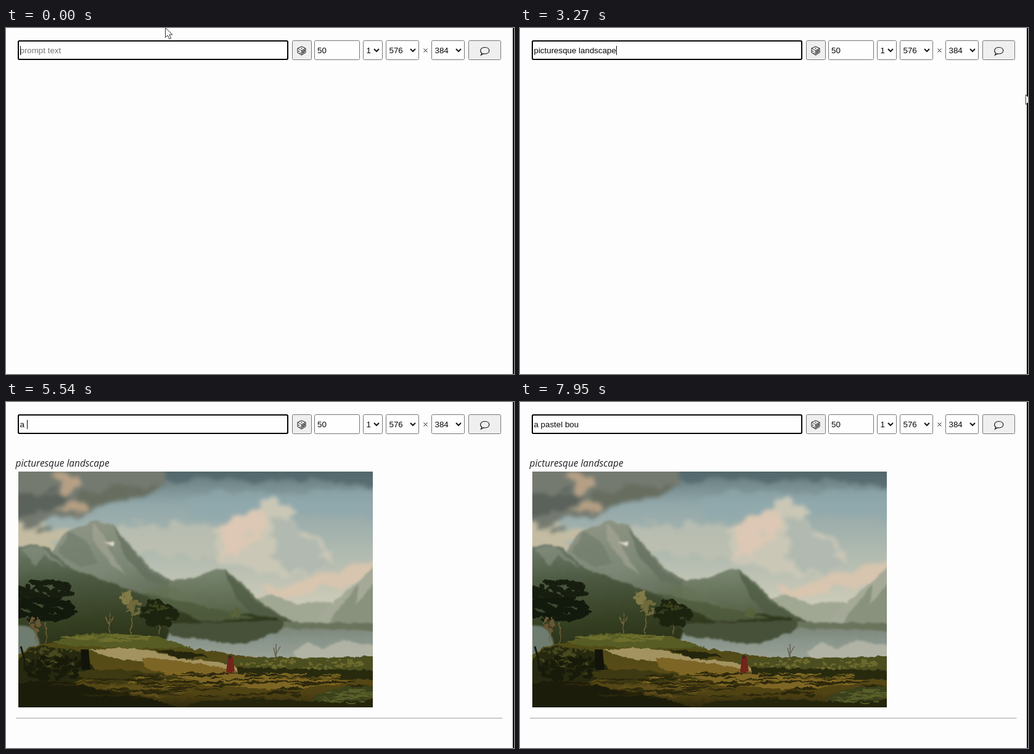
Animation of 824 by 562 pixels, one loop 7990 ms. Source, as an HTML page:

```html
<!DOCTYPE html>
<html lang="en">
<head>
<meta charset="utf-8">
<title>Prompt to picture</title>
<style>
html, body { margin: 0; width: 100%; height: 100%; overflow: hidden; background: #fdfdfd; }
svg { display: block; width: 824px; height: 562px; }
.ui { font: 13.333px "Liberation Sans", Arial, sans-serif; fill: #080808; white-space: pre; }
.box { fill: #fefefe; stroke: #767676; }
.button { fill: #efefef; }
.line { fill: none; stroke: #181818; }
</style>
</head>
<body>
<svg viewBox="0 0 824 562" xmlns="http://www.w3.org/2000/svg">
  <defs>
    <linearGradient id="sky" x2="0" y2="1">
      <stop offset="0" stop-color="#64787a"/><stop offset=".14" stop-color="#92a8aa"/>
      <stop offset=".36" stop-color="#b2bbb0"/><stop offset=".58" stop-color="#cfcdb9"/>
      <stop offset="1" stop-color="#c2bfa8"/>
    </linearGradient>
    <linearGradient id="peak" x2=".4" y2="1">
      <stop offset="0" stop-color="#929786"/><stop offset=".5" stop-color="#7c8775"/>
      <stop offset="1" stop-color="#505c43"/>
    </linearGradient>
    <linearGradient id="slope" x2=".2" y2="1">
      <stop offset="0" stop-color="#707d6c"/><stop offset=".35" stop-color="#4d5a42"/>
      <stop offset=".75" stop-color="#343e21"/><stop offset="1" stop-color="#293016"/>
    </linearGradient>
    <linearGradient id="ridge" x2=".1" y2="1">
      <stop offset="0" stop-color="#7b8771"/><stop offset=".5" stop-color="#647158"/>
      <stop offset="1" stop-color="#4c573c"/>
    </linearGradient>
    <linearGradient id="lake" x2="0" y2="1">
      <stop offset="0" stop-color="#788273"/><stop offset=".4" stop-color="#88948a"/>
      <stop offset="1" stop-color="#a3a89b"/>
    </linearGradient>
    <linearGradient id="land" x2="0" y2="1">
      <stop offset="0" stop-color="#4c4b18"/><stop offset=".45" stop-color="#594b17"/>
      <stop offset=".72" stop-color="#4f4213"/><stop offset="1" stop-color="#17160a"/>
    </linearGradient>
    <filter id="cloud" x="-10%" y="-10%" width="120%" height="120%" color-interpolation-filters="sRGB">
      <feTurbulence type="fractalNoise" baseFrequency=".03 .05" numOctaves="5" seed="9"/>
      <feDisplacementMap in="SourceGraphic" scale="36" xChannelSelector="R" yChannelSelector="G"/>
      <feGaussianBlur stdDeviation="3"/>
    </filter>
    <filter id="haze" x="-5%" y="-5%" width="110%" height="110%" color-interpolation-filters="sRGB">
      <feTurbulence type="fractalNoise" baseFrequency=".06" numOctaves="3" seed="4"/>
      <feDisplacementMap in="SourceGraphic" scale="7" xChannelSelector="R" yChannelSelector="G"/>
      <feGaussianBlur stdDeviation="1.400"/>
    </filter>
    <filter id="brush" x="-5%" y="-5%" width="110%" height="110%" color-interpolation-filters="sRGB">
      <feTurbulence type="fractalNoise" baseFrequency=".09" numOctaves="3" seed="2"/>
      <feDisplacementMap in="SourceGraphic" scale="7" xChannelSelector="R" yChannelSelector="G"/>
      <feGaussianBlur stdDeviation=".7"/>
    </filter>
    <clipPath id="canvas"><rect x="20" y="113" width="575" height="383"/></clipPath>
  </defs>

  <rect width="824" height="562" fill="#fdfdfd"/>
  <rect x="822" width="2" height="562" fill="#060606"/>
  <g id="controls"></g>
  <rect id="focus" x="20" y="21" width="437" height="30" rx="2" fill="none" stroke="#060606" stroke-width="2"/>
  <text id="prompt" class="ui" x="22.5" y="41"></text>
  <rect id="caret" y="29" width="1" height="15" fill="#080808"/>

  <g id="result">
    <text x="15.5" y="105" font-family="'Open Sans', 'Noto Sans', sans-serif" font-size="15.4" font-style="italic" fill="#222">picturesque landscape</text>
    <path id="rule" d="M16 0H805.500" stroke="#a0a0a0"/>
  </g>

  <g id="painting" clip-path="url(#canvas)">
    <rect x="20" y="113" width="575" height="383" fill="url(#sky)"/>
    <g filter="url(#cloud)">
      <path d="M240 95H620V142Q510 124 390 126Q300 130 240 126Z" fill="#4b6064" opacity=".65"/>
      <path d="M250 162Q390 140 620 146V190Q470 172 330 188Z" fill="#8faaae" opacity=".65"/>
      <path d="M170 207Q270 190 350 205L340 255Q260 250 200 240Z" fill="#c1c2b2" opacity=".7"/>
      <path d="M0 95H250Q265 135 250 148Q190 158 150 174Q115 192 85 190Q60 206 0 204Z" fill="#747a70"/>
      <path d="M0 155Q70 135 105 155Q85 180 0 190Z" fill="#5b625b"/>
      <path d="M120 150Q190 128 260 142Q190 162 130 173Z" fill="#676e60"/>
      <path d="M74 121Q110 108 129 124Q118 146 86 147Z" fill="#b5a085"/>
      <path d="M86 174Q110 157 132 171Q115 183 86 174Z" fill="#b39e83"/>
      <path d="M0 205Q60 198 105 208L80 242H0Z" fill="#c4bca2"/>
      <path d="M343 205Q370 175 412 172Q428 146 452 158Q478 175 470 205Q520 215 512 240Q550 255 505 278Q430 285 390 262Q350 270 335 248Z" fill="#cac7b6"/>
      <path d="M350 198Q390 165 424 180Q430 205 395 225Q365 250 338 254Q360 225 350 198Z" fill="#dcc8b4"/>
      <path d="M432 185Q480 190 472 220Q525 232 500 250L528 268Q470 288 436 260Z" fill="#a9b4ae" opacity=".75"/>
      <path d="M415 303Q520 290 620 244V280Q530 307 425 316Z" fill="#ddc6ae" opacity=".85"/>
    </g>
    <g filter="url(#haze)">
      <path d="M405 320L432 313L470 327L510 323L560 330V364H390Z" fill="#a0a793"/>
      <path d="M505 350L553 305L574 288L605 258V366H500Z" fill="#a4aa97"/>
      <path d="M530 350L574 293L568 330L605 284V362H525Z" fill="#7d8971" opacity=".7"/>
      <path d="M70 250L88 222L104 207L124 202L147 191L174 200L207 239L232 268L272 292L325 340L230 380L80 315Z" fill="url(#peak)"/>
      <path d="M140 198Q167 218 166 237L194 282L174 267L140 224Z" fill="#a8a996" opacity=".6"/>
      <path d="M174 203L207 242L231 272L266 297L230 292L193 250Z" fill="#616c59" opacity=".65"/>
      <path d="M102 210L130 225L150 262L120 268L84 245Z" fill="#6b7665" opacity=".5"/>
      <path d="M159 229L174 228L174 233Z" fill="#e4dfcd"/>
      <path d="M262 292L310 284L342 272L358 274L384 295L409 322L438 341L467 358L410 368H270Z" fill="url(#ridge)"/>
      <path d="M355 274L381 296L405 324L455 354L405 352L373 316Z" fill="#4e5b42" opacity=".7"/>
      <path d="M10 236L48 231L70 238L105 270L150 286L203 306L270 320L350 338L440 351L450 366L260 405H10Z" fill="url(#slope)"/>
      <path d="M25 238L55 234L100 269L78 259L62 249L48 267Z" fill="#8a9382" opacity=".6"/>
      <path d="M220 311L260 296L325 330L405 351L320 357Z" fill="#677454" opacity=".55"/>
      <path d="M10 365Q50 355 55 395L20 430H10Z" fill="#6f7c70"/>
      <path d="M265 373Q360 353 458 360H605V430H245Z" fill="url(#lake)"/>
      <path d="M255 360L458 355L445 370L410 386L370 394L325 385L270 381Z" fill="#475038"/>
      <path d="M450 358H605V374Q525 367 450 368Z" fill="#6a745d"/>
      <path d="M464 407L490 391L515 401L548 387L605 396V417H472Z" fill="#b9b9a9" opacity=".8"/>
    </g>
    <g filter="url(#brush)">
      <path d="M10 420Q38 390 85 390Q150 373 240 389Q315 404 400 414L605 418V510H10Z" fill="url(#land)"/>
      <path d="M75 389Q130 372 175 376L250 382L300 399L200 400L100 396Z" fill="#575c25"/>
      <path d="M134 403Q205 395 245 406Q275 418 355 423L390 440Q300 434 245 424L176 417Z" fill="#a39360"/>
      <path d="M220 414Q310 423 375 437Q460 454 560 451Q470 472 395 464Q310 460 225 431Z" fill="#7d6525"/>
      <path d="M240 402Q300 404 330 413L280 417Z" fill="#24250c"/>
      <path d="M345 423Q405 411 470 417L605 413V446L470 443Z" fill="#4b4f20"/>
      <path d="M376 431Q460 433 605 436V451Q480 449 376 441Z" fill="#282a0e"/>
      <path d="M10 432Q35 389 70 398L125 405L147 440L90 463L10 461Z" fill="#26290f"/>
      <path d="M100 441Q170 428 245 441L290 450L160 459Z" fill="#3d3912"/>
      <path d="M10 459Q90 444 150 467Q250 480 310 510H10Z" fill="#1c1c0a"/>
      <path d="M155 463Q230 454 305 470L245 480Z" fill="#5d4e1b"/>
      <path d="M505 476Q550 455 605 463V510H475Z" fill="#3b411b"/>
      <path d="M300 489Q420 477 520 488L605 483V510H270Z" fill="#25250c"/>
      <path d="M204 344L203 381M249 364V379M48 370L50 391M65 358V391M169 341L167 375M160 350L168 361L175 349" fill="none" stroke="#75663f" stroke-width="1.500"/>
      <g id="foliage"></g>
    </g>
    <path d="M121 402H134L137 435H123Z" fill="#12140a"/>
    <path d="M24 397L30 418V433" fill="none" stroke="#181b0c" stroke-width="3"/>
    <path d="M438 417L434 399M438 417V393M438 409L445 397" fill="none" stroke="#4b4735"/>
    <path d="M360 414Q365 409 368 415L371 437L362 441L357 438Z" fill="#71251b"/>
    <circle cx="363" cy="414" r="3" fill="#41281a"/>
  </g>

  <path id="pointer" d="M.5.500V16.500L4.300 13L7 19L9.500 18L7 12H12Z" fill="#fefefe" stroke="#303030"/>
</svg>
<script>
const LOOP = 7990, BLINK = 500;
const SUBMIT = 3990, DONE = 4420;
const $ = id => document.getElementById(id);

const box = (x, w, type = '') =>
  `<rect class="box ${type}" x="${x + .5}" y="20.5" width="${w - 1}" height="31" rx="2"/>`;
const label = (x, text) => `<text class="ui" x="${x}" y="41">${text}</text>`;
const select = (x, w, text) => box(x, w) + label(x + 5.5, text) +
  `<path class="line" d="M${x + w - 14} 34l4 4 4-4" stroke-width="2"/>`;

$('controls').innerHTML =
  box(19, 439) + box(464, 32, 'button') + box(500, 74) + label(505, '50') +
  select(579, 32, '1') + select(616, 54, '576') + select(690, 54, '384') +
  '<path class="line" d="M677.500 33.500l6 6m0-6l-6 6"/>' + box(750, 53, 'button') +
  `<path class="line" fill-opacity=".2" d="M479.500 30l6.500 3v7l-6.500 4l-6.500-4v-7z"/>
   <path d="M479.500 36.500l6.500-3.500v7l-6.500 4z" fill="#888"/>
   <path class="line" stroke-width=".7" d="M473 33l6.500 3.500l6.500-3.500M479.500 36.500v7"/>
   <path class="line" stroke-width="1.400" d="M475 37v1.400M477.300 40v1.400M482 38.500v1.400M484 36v1.400M478.800 33h1.400"/>
   <path class="line" stroke-width="1.200" d="M772 41C768 38 769 31.500 777 31.500C786 31.500 786 42 777 42L774.500 41.700L770.500 44Z"/>`;

let seed = 7;
const random = () => (seed = seed * 16807 % 2147483647) / 2147483647;

// Dabs of paint spread over an ellipse.
const dabs = (cx, cy, rx, ry, count, color, w = 4, h = 3) => {
  let dots = '';
  for (let i = 0; i < count; i++) {
    const r = Math.sqrt(random()), a = random() * 2 * Math.PI;
    dots += `<ellipse cx="${cx + rx * r * Math.cos(a)}" cy="${cy + ry * r * Math.sin(a)}"
      rx="${w * (.5 + random())}" ry="${h * (.5 + random())}"/>`;
  }
  return `<g fill="${color}">${dots}</g>`;
};

$('foliage').innerHTML =
  dabs(60, 308, 44, 17, 70, '#171e10', 7, 4) + dabs(58, 337, 54, 17, 80, '#12190d', 8, 4) +
  dabs(248, 344, 28, 21, 75, '#1c230f', 5, 4) + dabs(244, 333, 18, 7, 16, '#39401c', 3, 2) +
  dabs(195, 318, 9, 9, 22, '#817b48', 3, 3) + dabs(208, 334, 10, 11, 25, '#706a3c', 3, 3) +
  dabs(47, 361, 9, 11, 24, '#6a5633', 2, 3) + dabs(371, 342, 10, 6, 14, '#58633a', 3, 2) +
  dabs(75, 415, 45, 16, 60, '#48491f', 3, 2) + dabs(80, 432, 55, 18, 60, '#191b0a', 5, 3) +
  dabs(170, 383, 75, 6, 45, '#6e702d', 8, 1) + dabs(380, 450, 190, 14, 70, '#806921', 13, 1) +
  dabs(330, 462, 250, 22, 80, '#2b270c', 18, 1.3) + dabs(480, 425, 100, 8, 60, '#6c692d', 3, 2) +
  dabs(555, 477, 48, 12, 45, '#5a602a', 8, 1);

// Every edit of the prompt, as [time, text].
const edits = [[-170, '']];
const type = (start, gap, chars) => {
  for (let i = 0; i < chars.length; i++)
    edits.push([start + i * gap, edits.at(-1)[1] + chars[i]]);
};
type(1020, 99.3, 'picturesque landscape');
edits.push([DONE, edits.at(-1)[1]]);
for (let i = 0; i < 21; i++) edits.push([4790 + i * 25, edits.at(-1)[1].slice(0, -1)]);
type(5420, 100, 'a ');
type(6000, 100, 'pastel');
type(7150, 93, ' bou');

// Pointer tip as [time, x, y]; gaps between visits lie off stage.
const path = [
  [0, 258, -1], [150, 264, -24], [151, 850, 110], [3240, 850, 110], [3270, 820, 108],
  [3600, 780, 48], [3830, 775, 38], [3980, 775, 38], [4030, 776, 60],
  [4160, 796, 110], [4320, 830, 170], [LOOP, 850, 170]
];
const pointerAt = t => {
  const i = path.findIndex(p => p[0] > t);
  const [t0, x0, y0] = path[i - 1], [t1, x1, y1] = path[i];
  const k = (t - t0) / (t1 - t0);
  return [x0 + (x1 - x0) * k, y0 + (y1 - y0) * k];
};

const pen = document.createElement('canvas').getContext('2d');
pen.font = '13.333px "Liberation Sans", Arial, sans-serif';
const show = (id, on) => $(id).setAttribute('visibility', on ? 'visible' : 'hidden');

function draw(t) {
  const [time, text] = edits.findLast(e => e[0] <= t);
  const focused = t < 3800 || t >= DONE;
  $('prompt').textContent = text || 'prompt text';
  $('prompt').style.fill = text ? '#080808' : '#757575';
  $('caret').setAttribute('x', Math.round(22.5 + pen.measureText(text).width));
  show('caret', focused && (t - time) % (2 * BLINK) < BLINK);
  show('focus', focused);
  show('result', t >= SUBMIT);
  show('painting', t >= DONE);
  $('rule').setAttribute('transform', `translate(0 ${t < DONE ? 146.5 : 513.5})`);
  $('pointer').setAttribute('transform', `translate(${pointerAt(t)})`);
}

const start = performance.now();
function tick() {
  draw((performance.now() - start) % LOOP);
  requestAnimationFrame(tick);
}
tick();
</script>
</body>
</html>
```
